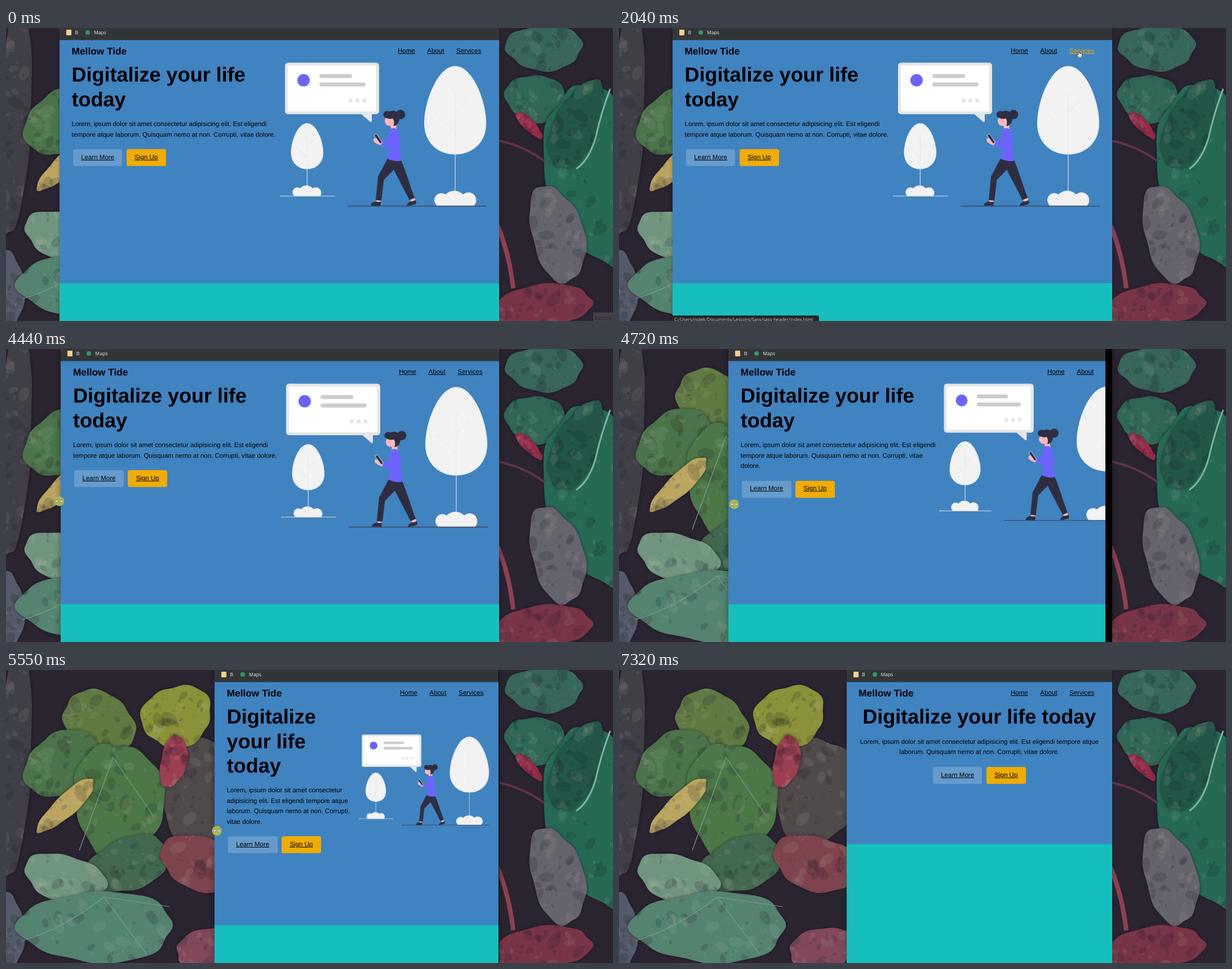
These frames come from a looping animation (1077x520 px, 7.39 s). An HTML page with a canvas:

```html
<!DOCTYPE html>
<html lang="en">
<head>
<meta charset="utf-8">
<title>Responsive header</title>
<style>
html, body { margin: 0; width: 100%; height: 100%; overflow: hidden; background: #29212f; }
#stage { position: relative; width: 1077px; height: 520px; overflow: hidden;
  font: 11.52px/18.43px "Liberation Sans", Arial, sans-serif; color: #000;
  text-rendering: geometricPrecision; }
#stage * { box-sizing: border-box; }
canvas, #win, #clip, #page, .pointer { position: absolute; left: 0; top: 0; }
#win { height: 520px; background: #000; }
#clip { height: 520px; overflow: hidden; background: #16bfbd; }
#page { height: 520px; }
#page > *, #bar > *, #status { position: absolute; }
#bar { left: 0; top: 0; width: 100%; height: 22px; color: #eee;
  background: linear-gradient(#323638 21px, #3a5f85 21px);
  font: 8.64px/12px "Open Sans", "Noto Sans", sans-serif; }
#bar span { top: 2px; }
.note { left: 12px; top: 3px; width: 9px; height: 10px; background: #f9cf8c; border-radius: 1px; }
.dot { left: 46px; top: 4px; width: 8px; height: 8px; border-radius: 50%; background: #2f9a66; }
#hero { left: 0; top: 21px; width: 100%; height: 431.7px; background: #4083c1; }
#logo { left: 21.6px; top: 31px; font-weight: bold; font-size: 17.28px; line-height: 20px; white-space: nowrap; }
nav { right: 31.8px; top: 32px; display: flex; gap: 21.6px; }
nav span, .btn { text-decoration: underline; white-space: nowrap; }
#row { left: 21.6px; right: 21.6px; top: 61.4px; display: grid; grid-template-columns: 1fr 1fr; }
#row > div { min-width: 0; }
h1 { margin: 0 0 14.4px; font-size: 36px; line-height: 43.2px; }
p { margin: 0 0 14.4px; }
.btns { height: 34.3px; white-space: nowrap; padding-top: 1.7px; }
.btn { display: inline-block; vertical-align: top; padding: 5.76px 14.4px; margin: 0 2.16px; border-radius: 3.6px; }
.soft { background: #669bcd; }
.gold { background: #f0ac00; }
#art { display: block; width: 100%; align-self: center; }
.small #hero { height: 288px; }
.small #row { display: block; text-align: center; }
.small #art { display: none; }
#status { left: 0; top: 510px; width: 260px; height: 16px; padding-left: 3px; background: #222426;
  border-top: 1px solid #3c4043; border-right: 1px solid #3c4043; border-radius: 0 3px 0 0;
  color: #d5d8db; font: 8.1px/14px "Open Sans", "Noto Sans", sans-serif; white-space: nowrap; }
#record { position: absolute; left: 1042px; top: 505px; width: 35px; height: 15px; background: #4d474f;
  color: #25222a; font: 9px/19px "Open Sans", "Noto Sans", sans-serif; text-align: center; }
.pointer { overflow: visible; width: 1px; height: 1px; }
</style>
</head>
<body>
<div id="stage">
  <canvas id="photo" width="1077" height="520"></canvas>
  <div id="record">Record</div>
  <div id="win"><div id="clip">
    <div id="page">
      <div id="hero"></div>
      <div id="logo">Mellow Tide</div>
      <nav><span>Home</span><span>About</span><span>Services</span></nav>
      <div id="row">
        <div>
          <h1>Digitalize your life today</h1>
          <p>Lorem, ipsum dolor sit amet consectetur adipisicing elit. Est eligendi tempore atque laborum. Quisquam nemo at non. Corrupti, vitae dolore.</p>
          <div class="btns"><span class="btn soft">Learn More</span> <span class="btn gold">Sign Up</span></div>
        </div>
        <svg id="art" viewBox="485 61.4 368.4 256">
          <g fill="#e6e6e6">
            <rect x="495" y="62" width="167" height="91.3" rx="5.5"/>
            <path d="M629 152H649V165.5Q648.5 168.5 645.5 166.5Z"/>
          </g>
          <rect x="500" y="67" width="156.6" height="81.2" rx="2" fill="#fff"/>
          <circle cx="528" cy="93.2" r="11" fill="#6c63ff"/>
          <path d="M559.5 85.7H610.5M559.5 100.6H634.5" stroke="#ccc" stroke-width="7" stroke-linecap="round"/>
          <path d="M611.5 129h0M623.5 129h0M635.8 129h0" stroke="#e6e6e6" stroke-width="7.2" stroke-linecap="round"/>
          <g fill="#f2f2f2">
            <path d="M797 68C827 68 852 128 852 170C852 204 827 225 797 225S742 204 742 170C742 128 767 68 797 68Z"/>
            <path d="M534.3 169.5C550 169.5 563 200 563 222C563 240 550 251 534.3 251S505.6 240 505.6 222C505.6 200 518 169.5 534.3 169.5Z"/>
            <path d="M797 224V292M534.3 250V282" stroke="#f2f2f2"/>
          </g>
          <path d="M797 113V224M797 187L760 151M797 150L819 128M534.3 188V250M534.3 231L515 212M534.3 212L546 200"
            fill="none" stroke="#e2e4e6" stroke-width=".9"/>
          <g fill="#f2f2f2">
            <path d="M765 316A12.5 12.5 0 0 1 780 296A21 21 0 0 1 811 296A13.5 13.5 0 0 1 830 316Z"/>
            <path d="M512 299A8.6 8.6 0 0 1 522 285A14.5 14.5 0 0 1 544 285A9.6 9.6 0 0 1 557 299Z"/>
          </g>
          <path d="M486 298.7H583.5" stroke="#dfe3e8" stroke-width="1.1"/>
          <path d="M606 316.5H854" stroke="#3f3d56" stroke-width="1.2"/>
          <g fill="#ffb8b8">
            <path d="M657 304H665V310H657ZM716 304L724 301L727 307L719 309Z"/>
            <circle cx="680.5" cy="165.5" r="8.6"/>
            <path d="M682 170H692L693 181H683Z"/>
          </g>
          <g fill="#2f2e41">
            <circle cx="700" cy="154" r="8.4"/>
            <path d="M670 157C668 149 675 146 681 148.5C688 145 697 149 697 157C700 167 694 174 687 174.5C690 169 688 163 686 161C681 163 674 161 670 157Z"/>
            <path d="M677 232L701 235C707 248 715 274 725 302L716 306L688 252L670.5 270L666 307L656 306L660 264Z"/>
            <path d="M647 314.5Q649 309.5 656 308.5Q661 310 665 308.5L664.5 316H648ZM711 315Q713 310 719 308Q723 308.5 727 305.5L728 312Q720 316 711.5 316Z"/>
          </g>
          <path d="M683 179C690 176 697 180 698 190C699 205 700 222 701.5 236C693 238 684 236 677 232.5C679 222 680 210 677 200C678 192 679 184 683 179Z" fill="#6c63ff"/>
          <path d="M685 187L678.5 209L666 203" fill="none" stroke="#6c63ff" stroke-width="8.5" stroke-linejoin="round"/>
          <path d="M652.5 196Q656 195 661 199L668 202L665 209Q658 207 652.5 202Z" fill="#ffb8b8"/>
          <path d="M652.7 190.5L657.3 188L667.5 203.5L664 206Z" fill="#2f2e41" stroke="#f2f2f2" stroke-width=".8"/>
        </svg>
      </div>
      <div id="bar"><i class="note"></i><span style="left:27.5px">B</span><i class="dot"></i><span style="left:61px">Maps</span></div>
    </div>
    <div id="status">C:/Users/nolek/Documents/Lessons/Sass/sass-header/index.html</div>
  </div></div>
  <svg class="pointer" id="arrow"><path d="M0 0V10L2.4 7.9L4 11.6L5.6 10.9L4.1 7.4H7.2Z" fill="#fff" stroke="#222" stroke-width=".7"/></svg>
  <svg class="pointer" id="hand"><path d="M-.9 .8Q0-.6 .9 .8V4.2L4.6 5Q5.8 5.3 5.6 7L4.6 11.5H-.4L-3.2 7.4Q-3 5.8-1.6 6.6L-.9 7.3Z" fill="#fff" stroke="#222" stroke-width=".7"/></svg>
  <svg class="pointer" id="sizer"><circle id="press" r="8.7" fill="#aab556"/><path d="M-6 0L-3-2.6V-.7H3V-2.6L6 0L3 2.6V.7H-3V2.6Z" fill="#fff" stroke="#555" stroke-width=".5"/></svg>
</div>
<script>
const $ = id => document.getElementById(id);
const LOOP = 7390, RIGHT = 875;
const GRAB = 4440, SETTLED = 5820, RELEASE = 6420, BLUR = 7320;

// Backdrop: wavy-edged leaves with seeded mottling
const ctx = $('photo').getContext('2d');
let seed = 11;
const rnd = () => (seed = (seed * 16807) % 2147483647) / 2147483647;

function mottle(rx, ry) {
  const n = Math.sqrt(rx * ry);
  for (let i = 0; i < n; i++) {
    const size = 1 + 9 * rnd() ** 3;
    ctx.fillStyle = rnd() < .6 ? 'rgba(24,22,32,.16)' : 'rgba(205,210,190,.09)';
    ctx.beginPath();
    ctx.ellipse((rnd() * 2 - 1) * rx, (rnd() * 2 - 1) * ry, size * 1.6, size, rnd() * 3, 0, 7);
    ctx.fill();
  }
}
function leaf(color, x, y, rx, ry, turn = 0) {
  const phase = rnd() * 6;
  ctx.save();
  ctx.translate(x, y);
  ctx.rotate(turn * Math.PI / 180);
  ctx.beginPath();
  for (let a = 0; a < 6.28; a += .05) {
    const r = 1 + .05 * Math.sin(3 * a + phase) + .025 * Math.sin(8 * a - phase);
    ctx.lineTo(rx * r * Math.cos(a), ry * r * Math.sin(a));
  }
  ctx.closePath();
  ctx.shadowColor = 'rgba(18,14,24,.6)';
  ctx.shadowBlur = 5;
  ctx.fillStyle = color;
  ctx.fill();
  ctx.shadowBlur = 0;
  ctx.clip();
  mottle(rx, ry);
  ctx.restore();
}
function vein(color, width, path) {
  ctx.strokeStyle = color;
  ctx.lineWidth = width;
  ctx.stroke(new Path2D(path));
}

ctx.fillStyle = '#2b2431';
ctx.fillRect(0, 0, 1077, 520);
leaf('#403e46', 12, 170, 32, 210, 4);
leaf('#555a6a', 0, 465, 32, 70);
leaf('#514a4b', 350, 215, 76, 95, 10);
leaf('#607b42', 165, 90, 67, 50, 25);
leaf('#4b744a', 105, 168, 74, 58, -20);
leaf('#4c7847', 200, 232, 80, 104, -5);
leaf('#8a9138', 303, 82, 63, 54, -20);
leaf('#9c3f52', 297, 162, 23, 47, 12);
leaf('#bba45e', 107, 240, 67, 19, -43);
leaf('#42684f', 215, 345, 78, 46, -20);
leaf('#7d444d', 350, 343, 78, 48, 15);
leaf('#70957e', 105, 370, 74, 42, 15);
leaf('#548370', 162, 456, 137, 63);
leaf('#81475a', 365, 494, 65, 36, -10);
vein('#7b9f8b', 1.2, 'M30 480Q100 460 174 403L250 505M174 403L290 420M190 155L130 320M190 155L262 260');

leaf('#37665a', 955, 35, 68, 40);
leaf('#2f6656', 940, 125, 54, 42, 10);
leaf('#266a56', 1048, 262, 86, 165, -14);
leaf('#235648', 1012, 172, 38, 84, 24);
leaf('#65636c', 978, 366, 46, 88, -15);
leaf('#962a4a', 928, 172, 32, 10, 45);
vein('#7fb5a1', 3, 'M1072 108Q1056 150 1046 195Q1034 235 1012 250');
vein('#613446', 4, 'M875 200Q920 210 955 236');
vein('#8f4051', 8, 'M872 350Q893 400 900 462');
leaf('#783547', 950, 492, 92, 36, -6);

// Pointer glides: leave, arrive, x, y
const glides = [
  [0, 790, 514, 177], [1010, 1350, 706, 42], [1600, 1760, 760, 42], [1910, 2040, 816, 41],
  [2130, 2760, 256, 228], [2900, 3530, 58, 243], [3700, 4150, 94, 270]
];
// Window drag: time, left edge, lagging layout edge, pointer x
const drag = [
  [GRAB, 97, 95, 94], [4720, 194, 129, 204], [5140, 289, 274, 308],
  [5550, 370, 366, 374], [SETTLED, 403.5, 403.5, 402]
];

const span = (t, a, b) => Math.min(1, Math.max(0, (t - a) / (b - a)));
const smooth = p => p * p * (3 - 2 * p);
const mix = (a, b, p) => a + (b - a) * p;
const shown = (t, a, b) => span(t, a, a + 90) - span(t, b, b + 110);

function dragged(t, k) {
  if (t < GRAB) return drag[0][2];
  let v = drag[0][k];
  for (let i = 1; i < drag.length; i++) v = mix(v, drag[i][k], span(t, drag[i - 1][0], drag[i][0]));
  return v;
}
function place(t) {
  if (t >= GRAB) {
    const out = smooth(span(t, RELEASE, 7050));
    const y = 270 + 18 * span(t, GRAB, SETTLED) ** .75;
    return [mix(dragged(t, 3), 990, out), mix(y, 524, out)];
  }
  let x = 1062, y = 530;
  for (const [a, b, toX, toY] of glides) {
    const p = smooth(span(t, a, b));
    x = mix(x, toX, p);
    y = mix(y, toY, p);
  }
  return [x, y];
}
function over(el, x, y) {
  const r = el.getBoundingClientRect();
  return x >= r.left && x <= r.right && y >= r.top && y <= r.bottom;
}
const links = [...document.querySelectorAll('nav span')];
const buttons = [...document.querySelectorAll('.btn')];

function draw(t) {
  const left = dragged(t, 1), lay = dragged(t, 2), width = RIGHT - lay;
  const [x, y] = place(t);
  const active = t >= GRAB && t < BLUR;

  $('win').style.left = left + 'px';
  $('win').style.width = RIGHT - left + 'px';
  $('win').style.boxShadow = active ? '0 0 10px rgba(0,0,0,.4)' : '0 0 5px rgba(0,0,0,.3)';
  $('clip').style.width = RIGHT - left - (left - lay) * .19 + 'px';
  $('page').style.width = width + 'px';
  $('page').className = width < 504 ? 'small' : '';
  $('status').style.opacity = shown(t, 1230, 2330) + shown(t, 2720, 3620);
  $('record').style.opacity = .8 * (1 - span(t, 0, 420));

  for (const link of links) link.style.color = over(link, x, y) ? '#f0ac00' : '';
  const hand = [...links, ...buttons].some(el => over(el, x, y));
  const sizing = t >= 4060 && t < RELEASE;
  const shape = sizing ? 'sizer' : hand ? 'hand' : 'arrow';
  for (const id of ['arrow', 'hand', 'sizer']) {
    $(id).style.display = id === shape ? '' : 'none';
    $(id).style.transform = `translate(${x}px, ${y}px)`;
  }
  $('press').style.display = t >= GRAB ? '' : 'none';
}

const start = performance.now();
function tick() {
  draw((performance.now() - start) % LOOP);
  requestAnimationFrame(tick);
}
draw(0);
requestAnimationFrame(tick);
</script>
</body>
</html>
```
